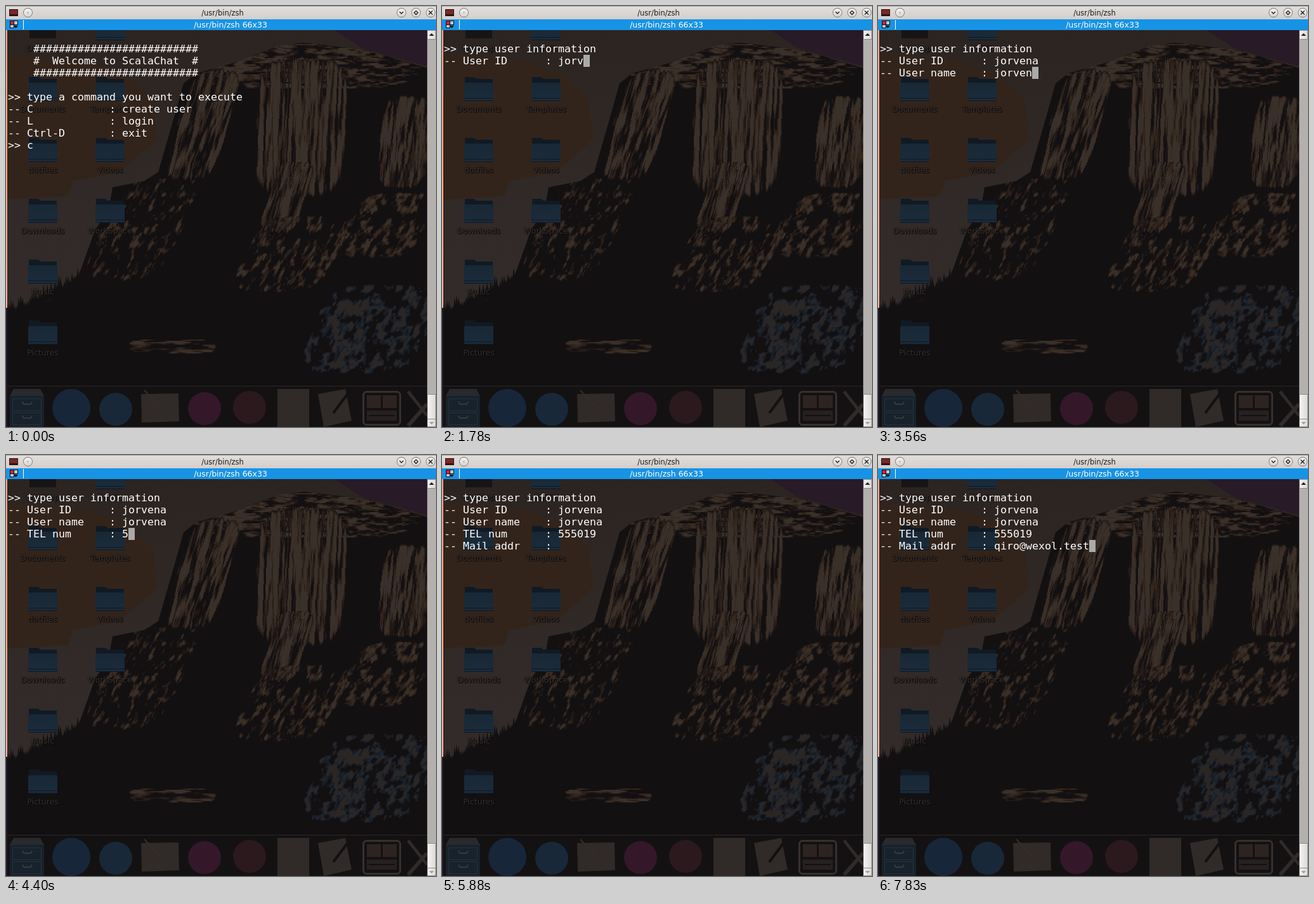
These frames come from a looping animation (678x664 px, 8000 ms). An HTML page with a canvas:

```html
<!DOCTYPE html>
<html lang="en">
<head>
<meta charset="utf-8">
<title>Terminal</title>
<style>
  html, body { margin: 0; width: 100%; height: 100%; overflow: hidden; background: #131012; }
  canvas, pre, #cursor { position: absolute; left: 0; top: 0; margin: 0; }
  pre {
    left: 3px; top: 39px; color: #fff;
    font: 16.61px/19px "DejaVu Sans Mono", monospace;
  }
  #cursor { width: 10px; height: 19px; background: #aaa; }
</style>
</head>
<body>
<canvas id="scene" width="678" height="664"></canvas>
<div id="cursor"></div>
<pre id="term"></pre>
<script>
const LOOP = 8000, TICK = 137, LEAD = 14;   // ms; the screen refreshes once per tick
const DARK = '#131012', PALE = '#302a28';
const BROWN = ['#1e1715', '#2a1f1a', '#34281f', '#3a302a'];
const BLUE = ['#1b1a1e', '#16222f', '#2b2624'];
const ctx = document.getElementById('scene').getContext('2d');
const term = document.getElementById('term');
const cursor = document.getElementById('cursor');

function rect(color, x, y, w, h) {
  ctx.fillStyle = color;
  ctx.fillRect(x, y, w, h);
}

function trace(pts) {
  ctx.beginPath();
  for (let i = 0; i < pts.length; i += 2) ctx.lineTo(pts[i], pts[i + 1]);
}

function poly(color, ...pts) {
  trace(pts);
  ctx.fillStyle = color;
  ctx.fill();
}

function line(color, width, ...pts) {
  trace(pts);
  ctx.strokeStyle = color;
  ctx.lineWidth = width;
  ctx.stroke();
}

function disc(color, x, y, r) {
  ctx.beginPath();
  ctx.arc(x, y, r, 0, Math.PI * 2);
  ctx.fillStyle = color;
  ctx.fill();
}

function label(text, x, y, size, color) {
  ctx.font = size + 'px "DejaVu Sans", sans-serif';
  ctx.textAlign = 'center';
  ctx.fillStyle = color;
  ctx.fillText(text, x, y);
}

function fade(x0, y0, x1, y1, ...colors) {
  const g = ctx.createLinearGradient(x0, y0, x1, y1);
  colors.forEach((c, i) => g.addColorStop(i / (colors.length - 1), c));
  return g;
}

function hash(x, y) {
  const s = Math.sin(x * 127.1 + y * 311.7) * 43758.5453;
  return s - Math.floor(s);
}

function noise(x, y) {
  const ix = Math.floor(x), iy = Math.floor(y);
  const smooth = f => f * f * (3 - 2 * f), mix = (a, b, f) => a + (b - a) * f;
  const fx = smooth(x - ix), fy = smooth(y - iy);
  return mix(mix(hash(ix, iy), hash(ix + 1, iy), fx),
    mix(hash(ix, iy + 1), hash(ix + 1, iy + 1), fx), fy);
}

// Posterised noise inside a leaning rounded box; gx, gy is the grain size, bare the share left dark
function rock(cx, cy, rx, ry, lean, gx, gy, bare, colors) {
  for (let y = cy - ry; y < cy + ry; y += 2) {
    const shift = lean * (y - cy), v = (y - cy) / ry;
    for (let x = -rx; x < rx; x++) {
      const edge = Math.min(1, 2.5 * (1 - (x / rx) ** 4 - v ** 4));
      if (edge <= 0) continue;
      const sx = cx + x, n = 0.6 * noise(sx / gx, y / gy) + 0.4 * noise(sx / gx * 2.3, y / gy * 2.3);
      const level = Math.floor((n * edge - bare) * 14);
      if (level >= 0) rect(colors[Math.min(level, colors.length - 1)], Math.round(sx + shift), y, 1, 2);
    }
  }
}

function drawSky() {
  rect(fade(0, 38, 0, 470, '#2c2421', '#2f2724', '#312a28', '#322b29'), 2, 38, 662, 562);
  poly('#33241b', 2, 75, 120, 84, 190, 108, 232, 150, 238, 210, 180, 262, 105, 276, 98, 300, 2, 305);
  poly('#281a27', 518, 38, 664, 38, 664, 95, 560, 66);
}

function drawMountain() {
  ctx.save();
  for (let x = 2; x < 118; x += 3) {
    const foot = 496 - x * 0.48, top = foot - 14 - 18 * hash(x, 1);
    poly(DARK, x - 3, foot, x, top, x + 4, foot);
  }
  const ridge = [2, 488, 70, 464, 115, 424, 140, 354, 162, 320, 168, 286, 218, 276, 240, 262, 266, 172,
    280, 122, 300, 106, 358, 90, 432, 62, 470, 58, 572, 70, 664, 98, 664, 600, 2, 600];
  poly(DARK, ...ridge);
  ctx.clip();

  rock(470, 94, 194, 38, 0, 16, 4, 0.42, BROWN);
  rock(310, 186, 44, 94, -0.3, 4, 30, 0.4, BROWN);
  rock(464, 190, 76, 116, -0.04, 4, 60, 0.33, BROWN);
  rock(442, 300, 34, 60, -0.3, 4, 34, 0.4, BROWN);
  rock(628, 214, 42, 78, -0.1, 4, 34, 0.36, BROWN);
  rock(600, 345, 70, 56, -0.5, 8, 11, 0.5, BROWN);
  rock(450, 390, 80, 66, -0.5, 6, 12, 0.54, BROWN);
  rock(215, 350, 70, 90, -0.5, 6, 11, 0.57, BROWN);
  rock(575, 508, 100, 76, -0.4, 9, 12, 0.48, BLUE);
  rock(262, 536, 74, 12, 0.1, 30, 5, 0.45, BROWN);
  ctx.restore();
}

function folder(x, y) {
  poly('#101a25', x - 22, y - 19, x - 7, y - 19, x - 4, y - 16, x + 22, y - 16, x + 22, y, x - 22, y);
  rect(fade(0, y - 10, 0, y + 18, '#192835', '#1a2b3b'), x - 23, y - 10, 46, 28);
  rect('#0f1822', x - 23, y + 14, 46, 1);
  rect('#0f1822', x - 23, y + 18, 46, 1);
}

function drawIcons() {
  const columns = [
    ['Desktop', 'Documents', 'dotfiles', 'Downloads', 'Music', 'Pictures'],
    ['Public', 'Templates', 'Videos', 'WorkSpace']
  ];
  columns.forEach((names, c) => names.forEach((name, r) => {
    const x = 58 + c * 106, y = 35 + r * 96;
    if (c + r) folder(x, y);
    else rect('#171415', x - 21, y - 16, 42, 32);
    label(name, x + 1, y + 37, 12.5, '#0d0b0b');
    ctx.shadowColor = '#000';
    ctx.shadowBlur = 3;
    label(name, x, y + 36, 12.5, '#383130');
    ctx.shadowColor = 'transparent';
  }));
}

function drawDock() {
  rect('#141113', 2, 599, 662, 65);
  rect('#2a2729', 2, 599, 662, 1);

  // cabinet
  poly('#292a2c', 12, 604, 54, 604, 60, 615, 6, 615);
  rect('#17222c', 6, 615, 54, 49);
  for (const y of [619, 641]) {
    ctx.strokeStyle = '#26323b';
    ctx.lineWidth = 1;
    ctx.strokeRect(10.5, y + 0.5, 45, 19);
    line('#38393a', 2, 26, y + 5, 28, y + 9, 39, y + 9, 41, y + 5);
  }

  disc('#18263a', 103, 634, 30);
  disc('#182838', 173, 636, 26);
  poly(PALE, 213, 612, 272, 611, 273, 655, 214, 657);
  line('#392d26', 2, 218, 606, 242, 632);
  disc('#34182a', 313, 635, 26);
  disc('#2c191d', 384, 633, 26);
  rect(PALE, 428, 604, 50, 60);

  // note and pen
  poly(PALE, 492, 612, 535, 604, 545, 654, 501, 664);
  line(DARK, 4, 543, 606, 516, 642);

  // panel
  ctx.strokeStyle = '#36302d';
  ctx.lineWidth = 3;
  ctx.beginPath();
  ctx.roundRect(563.5, 608.5, 58, 52, 5);
  ctx.stroke();
  for (const x of [569, 594]) rect('#2d2421', x, 614, 22, 20);
  rect('#262020', 569, 638, 47, 16);
  line(DARK, 2, 572, 646, 613, 646);

  // tools
  line(PALE, 5, 634, 608, 664, 646);
  line(PALE, 6, 634, 662, 664, 628);
}

function drawTitle() {
  const button = x => {
    disc('#7d7977', x, 10.5, 7.5);
    disc(fade(0, 3, 0, 18, '#f8f7f6', '#d4d0ce'), x, 10.5, 6.6);
  };
  rect(fade(0, 0, 0, 21, '#e2dfdd', '#d2cecc'), 0, 0, 678, 21);
  rect('#a9a5a3', 0, 0, 678, 1);
  rect('#2a1416', 5, 5, 14, 11);
  rect('#7c2722', 6, 6, 12, 7);
  [34.5, 623.5, 646.5, 669.5].forEach(button);
  disc('#8b8785', 34.5, 10.5, 0.9);
  line('#222', 1.4, 620.5, 9, 623.5, 12, 626.5, 9);
  line('#222', 1.4, 646.5, 7.5, 649.5, 10.5, 646.5, 13.5, 643.5, 10.5, 646.5, 7.5);
  line('#222', 1.4, 666.5, 7.5, 672.5, 13.5);
  line('#222', 1.4, 672.5, 7.5, 666.5, 13.5);
  label('/usr/bin/zsh', 341.5, 15, 11.5, '#1c1a19');
}

function drawTab() {
  rect('#1793e6', 0, 21, 678, 17);
  rect('#111', 6, 23, 13, 12);
  rect('#d6202a', 7, 24, 5, 5);
  rect('#b9c6d2', 13, 24, 5, 5);
  rect('#b9c6d2', 7, 30, 5, 4);
  rect('#1793e6', 13, 30, 6, 5);
  poly('#111', 12, 31, 19, 31, 15.5, 35);
  rect('#fff', 27, 22, 1, 15);
  label('/usr/bin/zsh 66x33', 354, 34, 12.5, '#fff');
}

function drawSides() {
  const knob = (y, h) => {
    rect('#8e8a88', 664, y, 14, h);
    rect(fade(665, 0, 677, 0, '#f4f3f2', '#dedbd9'), 665, y + 1, 12, h - 2);
  };
  rect(fade(0, 38, 0, 480, '#e9a890', '#f2ab86', '#efb49f'), 0, 38, 2, 438);
  rect('#211b2c', 0, 476, 2, 188);
  rect('#b4b0ae', 664, 38, 14, 626);
  rect('#9c9896', 664, 38, 1, 626);
  knob(38, 15);
  knob(612, 40);
  knob(651, 13);
  poly('#1c1a19', 667, 47, 671, 43, 675, 47);
  poly('#a5a19f', 667, 656, 675, 656, 671, 660);
}

const row = (name, value) => ('-- ' + name).padEnd(16) + ': ' + value;
const bar = '    ' + '#'.repeat(26);
const welcome = ['', bar, '    #  Welcome to ScalaChat  #', bar, '',
  '>> type a command you want to execute',
  row('C', 'create user'), row('L', 'login'), row('Ctrl-D', 'exit'), '>> c'];

// open, first: ticks of the prompt and first key; typed: one chunk per tick, empty for a pause
const fields = [
  { name: 'User ID', open: 1, first: 11, typed: 'j o rv en a' },
  { name: 'User name', open: 17, first: 22, typed: 'j o r ve n a' },
  { name: 'TEL num', open: 29, first: 32, typed: '5 5 5  01 9' },
  { name: 'Mail addr', open: 39, first: 47, typed: 'qi ro  @ w ex ol . te  st' }
];

function render(tick) {
  const shown = fields.filter(f => tick >= f.open);
  const last = shown[shown.length - 1];
  const entry = f => f.typed.split(' ').slice(0, Math.max(0, tick - f.first + 1)).join('');
  const lines = last
    ? ['', '>> type user information', ...shown.map(f => row(f.name, entry(f)))]
    : welcome;
  // the cursor blinks every four ticks until typing begins
  const lit = last && (tick >= last.first || Math.floor((tick - last.open) / 4) % 2 === 0);
  const bottom = lines.length - 1;
  term.textContent = lines.join('\n');
  cursor.style.visibility = lit ? 'visible' : 'hidden';
  cursor.style.transform = `translate(${3 + lines[bottom].length * 10}px, ${39 + bottom * 19}px)`;
}

let current = -1;
function animate() {
  const tick = Math.floor((performance.now() % LOOP + LEAD) / TICK);
  if (tick !== current) render(current = tick);
  requestAnimationFrame(animate);
}

drawSky();
drawMountain();
drawIcons();
drawDock();
drawTitle();
drawTab();
drawSides();
animate();
</script>
</body>
</html>
```
